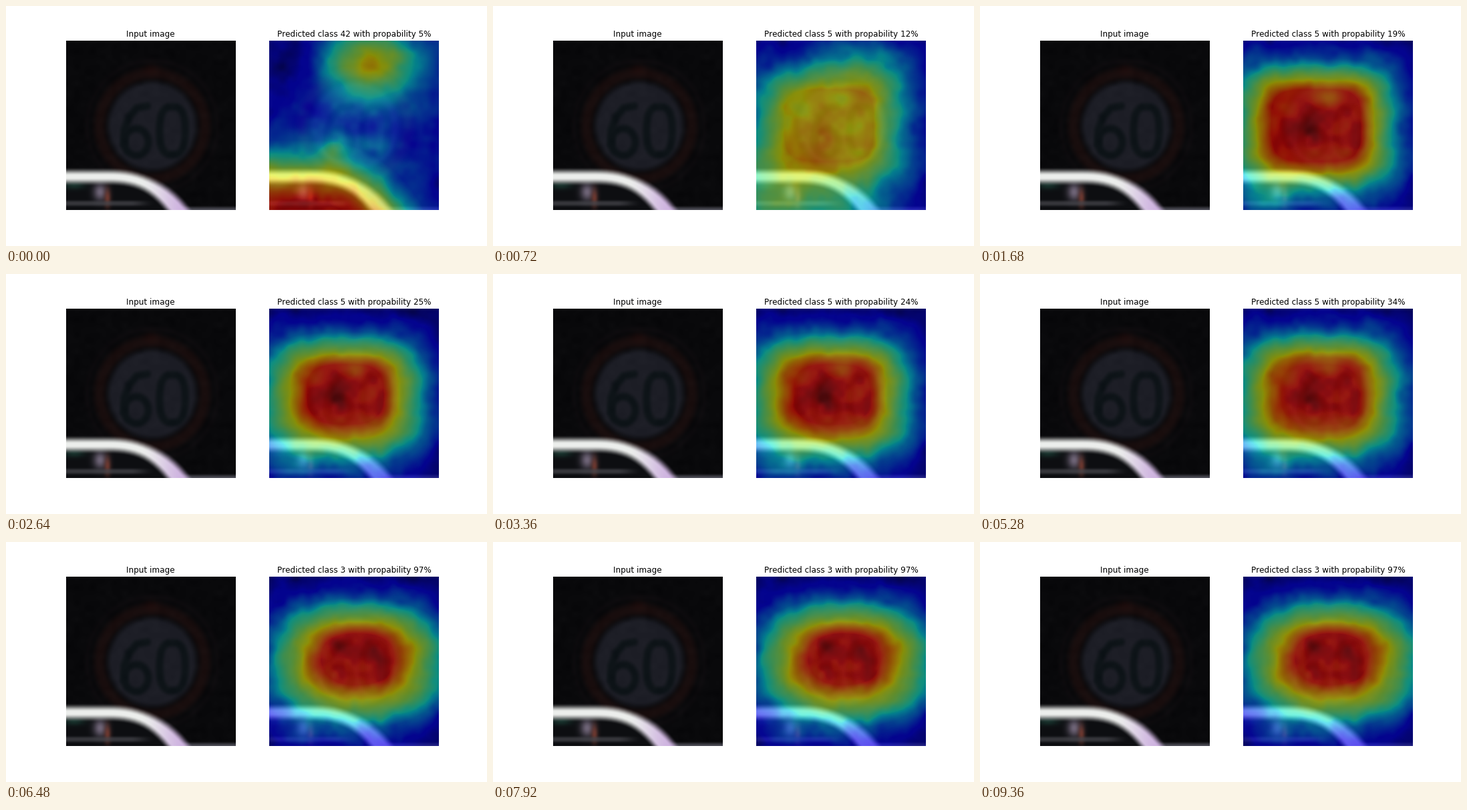
Write a matplotlib script that moves like this. It is 720 px wide and 360 px high and loops after 9600 ms.

```python
import numpy as np
import matplotlib.pyplot as plt
from matplotlib.animation import FuncAnimation

W, H, DPI = 720, 360, 72
SIDE, TOP, PANEL = 254, 52, 253.6
LEFT, RIGHT = 90, W * 0.9 - PANEL
FRAMES, STEP = 40, 240

plt.rcParams.update({"font.family": "DejaVu Sans", "text.kerning_factor": 6})
rng = np.random.default_rng(6)
y, x = np.mgrid[0:SIDE, 0:SIDE] + 0.5  # pixel centres inside a panel


# ---------- helpers ----------
def soft(d, half, blur):
    """Mask that is 1 below distance `half`, fading over `blur` pixels."""
    t = np.clip((half - d) / blur + 0.5, 0, 1)
    return t * t * (3 - 2 * t)


def blot(cx, cy, rx, ry):
    return np.exp(-((x - cx) / rx) ** 2 - ((y - cy) / ry) ** 2)


def line_dist(pts):
    best = np.full(x.shape, 1e9)
    for (ax, ay), (bx, by) in zip(pts, pts[1:]):
        dx, dy = bx - ax, by - ay
        t = np.clip(((x - ax) * dx + (y - ay) * dy) / (dx * dx + dy * dy), 0, 1)
        best = np.minimum(best, np.hypot(x - ax - t * dx, y - ay - t * dy))
    return best


def oval(cx, cy, rx, ry, power=1.0):
    a = np.linspace(0, 2 * np.pi, 29)
    c, s = np.cos(a), np.sin(a)
    return list(zip(cx + rx * np.sign(c) * abs(c) ** power,
                    cy + ry * np.sign(s) * abs(s) ** power))


def smooth_noise(cells):
    pos = np.arange(SIDE)[:, None] / SIDE * cells
    g = np.exp(-((pos - np.arange(-1, cells + 2)) / 0.65) ** 2)
    g /= g.sum(1, keepdims=True)
    f = g @ rng.normal(size=(cells + 3, cells + 3)) @ g.T
    return f / f.std()


def arc_y(u):
    """Centre line of the bright arc: flat, then bending down."""
    return 204 + 54 * np.clip((u - 60) / 110, 0, None) ** 2.6


arc_u = np.linspace(-10, 178, 24)
arc_dist = line_dist(list(zip(arc_u, arc_y(arc_u))))
below_arc = y > arc_y(x)


# ---------- camera picture ----------
def paint(img, mask, color):
    img += mask[..., None] * (np.asarray(color, float) - img)


def camera_picture():
    img = np.ones((SIDE, SIDE, 3)) * (9, 9, 11)
    r = np.hypot(x - 129, y - 128)
    paint(img, 0.5 * soft(abs(r - 98), 3, 10), (17, 13, 16))
    paint(img, soft(abs(r - 79), 8, 14), (25, 14, 14))
    paint(img, 0.6 * blot(128, 44, 12, 9), (34, 14, 13))
    paint(img, soft(r, 66, 14), (29, 30, 38))

    six = [(121, 98), (106, 101), (94, 115), (87, 134), (87, 154)]
    for pts in (six, oval(105, 152, 18, 20), oval(159, 135, 19, 36, 0.75)):
        paint(img, soft(line_dist(pts), 5.5, 9), (14, 20, 24))
    img += 0.8 * smooth_noise(32)[..., None]

    # dark car interior below the arc
    paint(img, soft(arc_y(x) + 6 - y, 0, 8), (13, 14, 17))
    paint(img, 0.9 * blot(12, 217, 16, 6), (24, 52, 46))
    paint(img, 0.8 * blot(51, 227, 10, 13), (135, 122, 145))
    paint(img, 0.8 * blot(62, 236, 5, 14), (125, 62, 50))
    paint(img, 0.7 * soft(abs(y - 244), 3.5, 6) * soft(x, 115, 40), (72, 72, 78))
    paint(img, 0.9 * soft(250 - y, 0, 7) * soft(165 - x, 0, 16), (80, 80, 90))

    white, lilac = np.array([236, 238, 236]), np.array([206, 178, 224])
    t = soft(145 - x, 0, 70)[..., None]
    half = 8 + 4.5 * t[..., 0]
    img += soft(arc_dist, half, 13)[..., None] * (white + (lilac - white) * t - img)
    return np.clip(img, 0, 255) / 255


# ---------- heat maps ----------
def bumps(*items):
    return sum(amount * blot(*place) for *place, amount in items)


def dome(cx, cy, left, right, up, down, core, power):
    """Rounded hill: red inside `core`, teal at radius 1, navy far outside."""
    u = abs(x - cx) / np.where(x < cx, left, right)
    v = abs(y - cy) / np.where(y < cy, up, down)
    d = (u ** power + v ** power) ** (1 / power)
    return np.interp(d, [0, core, (1 + core) / 2, 1, 1.13, 1.36, 1.6],
                     [0.92, 0.88, 0.6, 0.37, 0.25, 0.13, 0.04])


depth = np.where(below_arc, arc_dist, -arc_dist)
start = 0.13 + np.interp(depth, [-90, -55, -30, -12, 0, 15, 40],
                         [0, 0.07, 0.24, 0.45, 0.53, 0.64, 0.79])
start += bumps((151, 33, 60, 42, 0.32), (151, 38, 90, 75, 0.22),
               (31, 25, 50, 50, -0.13), (96, 163, 18, 22, 0.18),
               (150, 160, 40, 14, 0.08))
middle = dome(111, 123, 118, 111, 85, 100, 0.58, 4) + bumps(
    (128, 86, 22, 14, -0.13), (99, 130, 18, 18, 0.08), (30, 245, 50, 30, 0.14))
wide = dome(116, 123, 118, 109, 78, 100, 0.5, 3) + bumps(
    (128, 90, 18, 14, -0.1), (100, 131, 18, 18, 0.08), (20, 240, 50, 30, 0.08))
final = dome(131, 120, 120, 125, 78, 95, 0.44, 2.4) + bumps(
    (105, 104, 12, 10, 0.05), (157, 119, 14, 12, 0.07), (40, 245, 50, 25, 0.07))

picture = camera_picture()
late = (middle + wide) / 2
KEYS = [(0, start), (4, 0.9 * middle + 0.1 * start), (7, middle), (11, wide),
        (18, late), (21, late), (26, final), (FRAMES, final)]
grain = [smooth_noise(12) + 0.6 * smooth_noise(26) for _ in range(3)]
jet = plt.get_cmap("jet")


def heat_at(k):
    for (k0, a), (k1, b) in zip(KEYS, KEYS[1:]):
        if k < k1:
            base = a + (b - a) * (k - k0) / (k1 - k0)
            break
    drift = grain[0] + 0.3 * (np.sin(k * 0.9) * grain[1] + np.cos(k * 1.3) * grain[2])
    return np.clip(base + 0.013 * drift, 0, 1)


def blend(k):
    return np.clip(0.54 * jet(heat_at(k))[..., :3] + 0.45 * picture, 0, 1)


def caption(k):
    label = 42 if k < 2 else 5 if k < 23 else 3
    prob = np.interp(k, [0, 2, 7, 11, 18, 22, 27], [5, 10, 19, 25, 22, 34, 97])
    return f"Predicted class {label} with propability {prob:.0f}%"


# ---------- stage ----------
fig = plt.figure(figsize=(W / DPI, H / DPI), dpi=DPI, facecolor="white")


def panel(left, data, title):
    ax = fig.add_axes([left / W, 1 - (TOP + SIDE) / H, PANEL / W, SIDE / H])
    ax.axis("off")
    shown = ax.imshow(data, interpolation="nearest", aspect="auto")
    return shown, ax.set_title(title, fontsize=12, pad=6)


panel(LEFT, picture, "Input image")
overlay, heading = panel(RIGHT, blend(0), caption(0))


def update(k):
    overlay.set_data(blend(k))
    heading.set_text(caption(k))
    return overlay, heading


anim = FuncAnimation(fig, update, frames=FRAMES, interval=STEP, repeat=True,
                     repeat_delay=0, blit=False)
plt.show()
```
